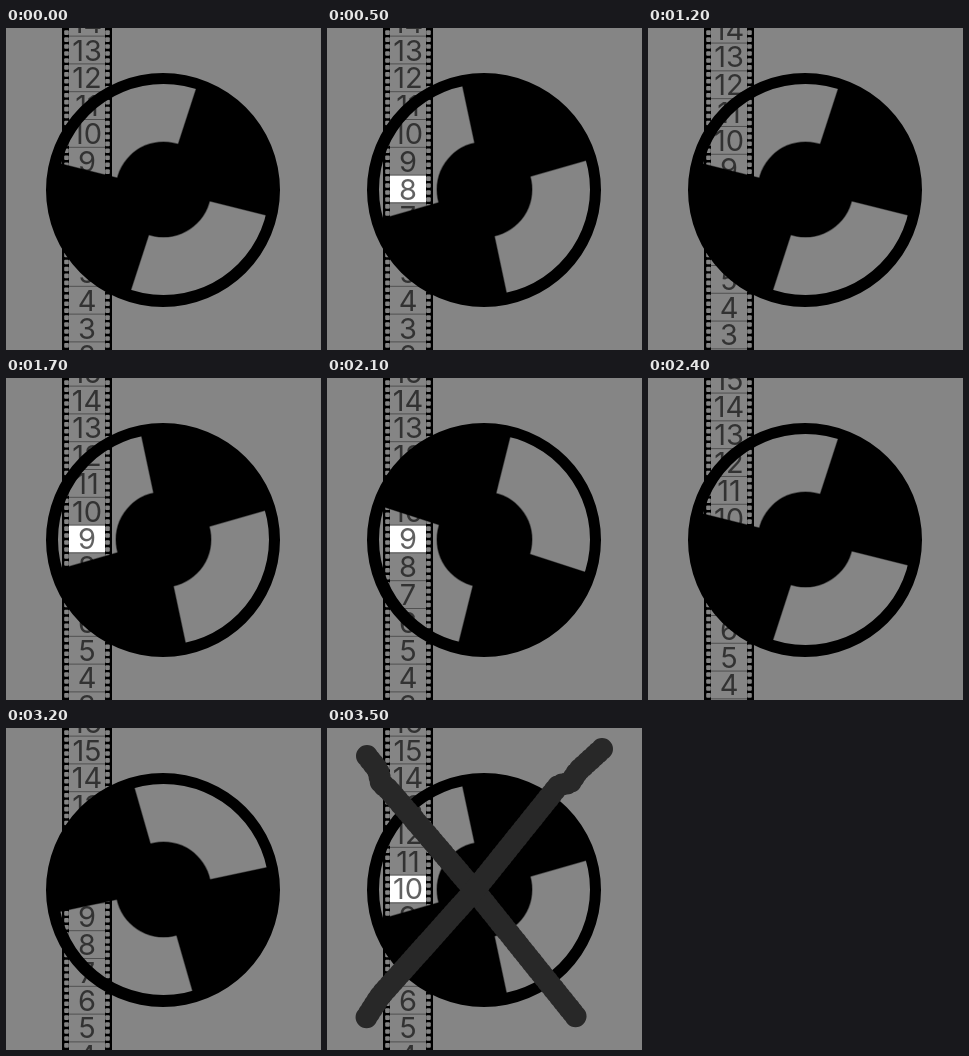
Recreate the animation shown at these times as an HTML page. Size 315 by 322 pixels, loop 3.6 s.

```html
<!DOCTYPE html>
<html lang="en">
<head>
<meta charset="utf-8">
<title>Two-blade film shutter</title>
<style>
  html, body { margin: 0; width: 100%; height: 100%; overflow: hidden; background: #858585; }
  svg { display: block; width: 100%; height: 100%; }
  text { font: 400 29px Inter, "Open Sans", sans-serif; text-anchor: middle; fill: #000; fill-opacity: .62; }
  .soft { stroke: #000; stroke-opacity: .4; stroke-width: 1.4; }
  #cross path { fill: none; stroke: #282828; stroke-width: 22; stroke-linecap: round; stroke-linejoin: round; stroke-dasharray: 0 5; }
</style>
</head>
<body>
<svg viewBox="0 0 315 322">
  <rect width="315" height="322" fill="#858585"/>
  <rect x="56" width="7" height="322"/>
  <rect x="99" width="7" height="322"/>
  <rect id="gate" x="63" y="147" width="36" height="27.5" fill="#fff"/>
  <g id="film"></g>
  <path id="rim" fill-rule="evenodd"/>
  <g transform="translate(157.5 161.5)">
    <circle class="soft" r="47.5"/>
    <g id="blades"></g>
  </g>
  <g id="cross">
    <path d="M40 28L51 42L54 55L62 62L148 163L250 290"/>
    <path d="M275 21L251 43L243 55L232 57L147 163L54 267L50 273L39 290"/>
  </g>
</svg>
<script>
const STEP = 100, STEPS = 36, TURN = 12;
const PITCH = 27.8, GATE_Y = 161, FIRST = 8;
const $ = id => document.getElementById(id);

function add(parent, tag, attrs, label) {
  const el = document.createElementNS("http://www.w3.org/2000/svg", tag);
  for (const name in attrs) el.setAttribute(name, attrs[name]);
  if (label !== undefined) el.textContent = label;
  parent.append(el);
}

// Film: one number, one frame line and four perforation pairs per frame
for (let n = 1; n <= 17; n++) {
  const y = GATE_Y + (FIRST - n) * PITCH, top = y - PITCH / 2;
  add($("film"), "rect", { x: 63, y: top - 0.5, width: 36, height: 1, fill: "#505050" });
  add($("film"), "text", { x: 81, y: y + 10.5 }, n);
  for (let i = 0; i < 4; i++)
    for (const x of [58.2, 99.2])
      add($("film"), "rect", { x, y: top + (i + 0.5) * PITCH / 4 - 2.3, width: 4.6, height: 4.6, rx: 1, fill: "#858585" });
}

// Shutter: a rim around two opposite sectors, angles clockwise from the top
const ring = (x, y, r) => `M${x - r} ${y}a${r} ${r} 0 1 1 ${2 * r} 0a${r} ${r} 0 1 1 ${-2 * r} 0Z`;
$("rim").setAttribute("d", ring(157, 162, 117) + ring(157.5, 161.5, 105.5));

function sector(from, to, r) {
  const point = deg => {
    const a = deg * Math.PI / 180;
    return `${r * Math.sin(a)} ${-r * Math.cos(a)}`;
  };
  return `M0 0L${point(from)}A${r} ${r} 0 0 1 ${point(to)}Z`;
}
for (const turn of [0, 180])
  add($("blades"), "path", { class: "soft", d: sector(18 + turn, 104 + turn, 108) });

// The film is pulled down one frame per turn while a blade covers the gate
function draw(step) {
  const turn = Math.floor(step / TURN), phase = step % TURN;
  const pulled = turn ? turn - 1 + Math.min(1, (phase + 1) / 4) : 0;
  $("film").setAttribute("transform", `translate(0 ${pulled * PITCH})`);
  $("blades").setAttribute("transform", `rotate(${step * 30})`);
  $("gate").style.display = step % 6 >= 3 ? "" : "none";
  $("cross").style.display = step === STEPS - 1 ? "" : "none";
}

const start = performance.now();
function tick() {
  draw(Math.floor((performance.now() - start) / STEP) % STEPS);
  requestAnimationFrame(tick);
}
tick();
</script>
</body>
</html>
```
